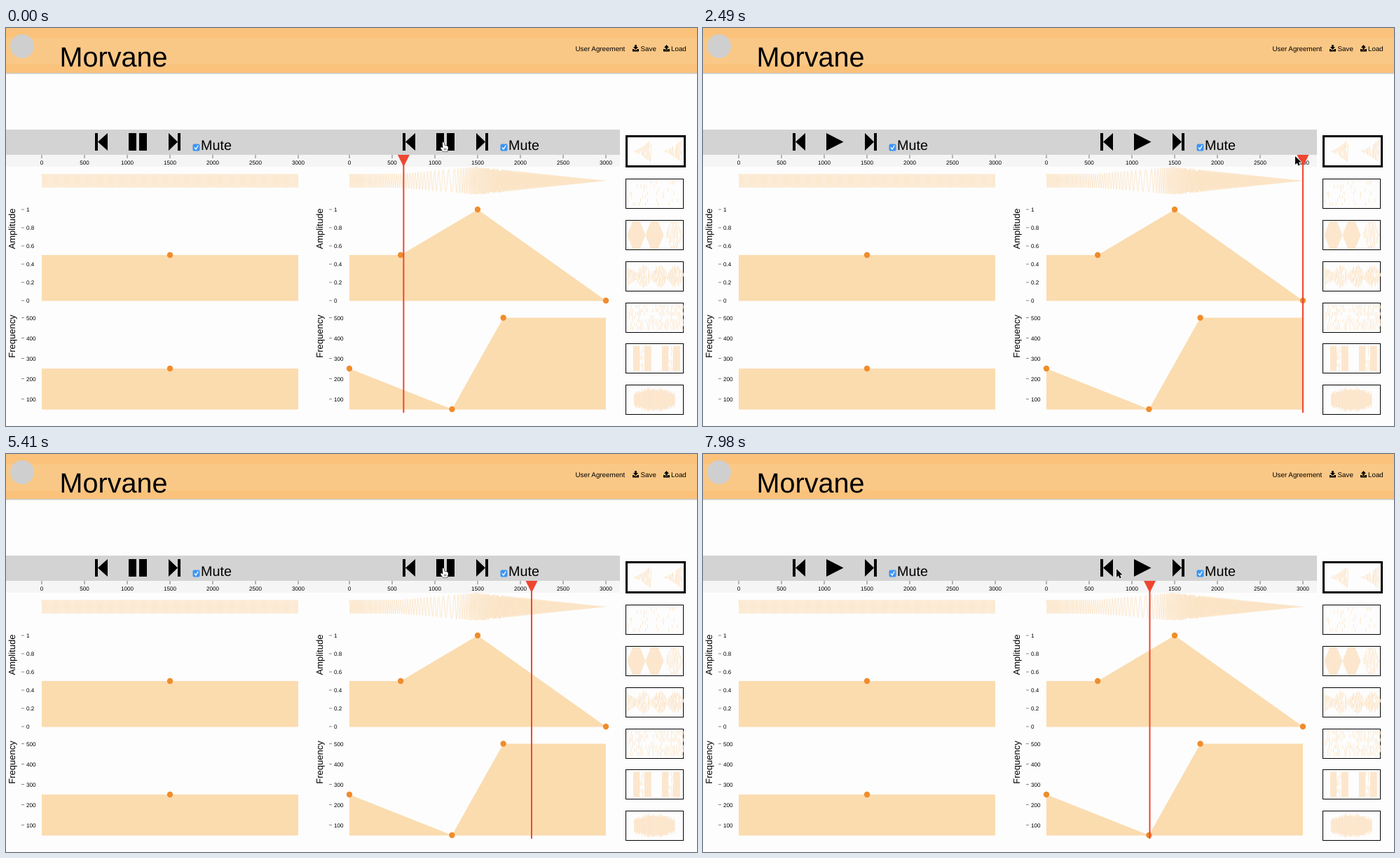
An HTML page with a canvas for the animation above (8 s loop, 986 by 568 pixels).

```html
<!DOCTYPE html>
<html lang="en">
<head>
<meta charset="utf-8">
<title>Vibration editor</title>
<style>
html, body { margin: 0; width: 100%; height: 100%; overflow: hidden; background: #fdfdfd; }
canvas { display: block; }
</style>
</head>
<body>
<canvas id="stage" width="986" height="568"></canvas>
<script>
const W = 986, H = 568, LOOP = 8000;
const PANE = 439, LEFT = 51, PX_PER_MS = 0.122, LENGTH = 3000;
const FONT = 'px "Liberation Sans", Arial, sans-serif';
const AREA = '#fbdcaf', WAVE = '#fce2c2', DOT = '#f08c2c', RED = '#ee4630';

const view = document.getElementById('stage').getContext('2d');
const backdrop = document.createElement('canvas');
backdrop.width = W;
backdrop.height = H;
let g = backdrop.getContext('2d');
g.textRendering = view.textRendering = 'geometricPrecision';

const timeX = ms => LEFT + ms * PX_PER_MS;
const ampY = a => 389 - a * 130;
const freqY = f => 413.5 + (500 - f) * 0.29;
const mix = (a, b, p) => a + (b - a) * p;
const smooth = p => p * p * (3 - 2 * p);

function rect(x, y, w, h, color) {
  g.fillStyle = color;
  g.fillRect(x, y, w, h);
}

function poly(points, color) {
  g.beginPath();
  points.forEach(([x, y]) => g.lineTo(x, y));
  g.closePath();
  g.fillStyle = color;
  g.fill();
}

function disc(x, y, r, color) {
  g.beginPath();
  g.arc(x, y, r, 0, 7);
  g.fillStyle = color;
  g.fill();
}

function text(str, x, y, size, align = 'left') {
  g.font = size + FONT;
  g.textAlign = align;
  g.fillStyle = '#000';
  g.fillText(str, x, y);
}

function sideText(str, x, y) {
  g.save();
  g.translate(x, y);
  g.rotate(-Math.PI / 2);
  text(str, 0, 0, 13, 'center');
  g.restore();
}

/* ---- static parts ---- */

function transferIcon(x, up) {
  const y = 24;
  poly(up ? [[x + 4.5, y], [x + 8, y + 4], [x + 1, y + 4]]
          : [[x + 1, y + 3], [x + 8, y + 3], [x + 4.5, y + 7]], '#000');
  rect(x + 3.2, up ? y + 3 : y, 2.6, 4, '#000');
  poly([[x, y + 6], [x + 2, y + 6], [x + 3, y + 7.5], [x + 6, y + 7.5], [x + 7, y + 6],
        [x + 9, y + 6], [x + 9, y + 9.5], [x, y + 9.5]], '#000');
}

function header() {
  rect(0, 0, W, 65, '#fac27b');
  rect(0, 14, W, 38, '#fac886');
  rect(0, 64, W, 1.5, '#cfcac4');
  disc(23, 26, 17, '#cfcfcf');
  text('Morvane', 76.5, 55, 39.6);
  text('User Agreement', 812.5, 33, 9.8);
  transferIcon(894, false);
  text('Save', 905.5, 33, 9.8);
  transferIcon(938, true);
  text('Load', 949, 33, 9.8);
}

// Value at a time on a curve of [time, value] points, flat beyond its ends
function valueAt(curve, ms) {
  const i = curve.findIndex(point => point[0] > ms);
  if (i < 0) return curve[curve.length - 1][1];
  if (i === 0) return curve[0][1];
  const [t0, a] = curve[i - 1], [t1, b] = curve[i];
  return mix(a, b, (ms - t0) / (t1 - t0));
}

function graph(curve, toY, base) {
  const ends = [0, LENGTH].map(ms => [ms, valueAt(curve, ms)]);
  const points = [ends[0], ...curve, ends[1]].map(([ms, v]) => [timeX(ms), toY(v)]);
  poly([[timeX(0), base], ...points, [timeX(LENGTH), base]], AREA);
  for (const [ms, v] of curve) disc(timeX(ms), toY(v), 4.2, DOT);
}

function wave(amp, freq) {
  const step = 0.2;
  let cycles = 0;
  g.beginPath();
  for (let x = 0; x <= LENGTH * PX_PER_MS; x += step) {
    const ms = x / PX_PER_MS;
    cycles += valueAt(freq, ms) / 470 * step;
    g.lineTo(LEFT + x, 218 - 20 * valueAt(amp, ms) * Math.sin(cycles * 2 * Math.PI));
  }
  g.strokeStyle = WAVE;
  g.lineWidth = 0.8;
  g.stroke();
}

function pane(offset, amp, freq) {
  g.save();
  g.translate(offset, 0);
  for (let ms = 0; ms <= LENGTH; ms += 500) {
    rect(timeX(ms) - 0.5, 181, 1, 5, '#777');
    text(ms, timeX(ms), 195, 8.1, 'center');
  }
  const tick = (label, y) => {
    rect(22, y - 0.5, 4, 1, '#888');
    text(label, 29, y + 3, 8.1);
  };
  for (let i = 0; i <= 5; i++) tick(i / 5, ampY(i / 5));
  for (let f = 100; f <= 500; f += 100) tick(f, freqY(f));
  sideText('Amplitude', 12.5, 286.5);
  sideText('Frequency', 12.5, 440);
  wave(amp, freq);
  graph(amp, ampY, 389.5);
  graph(freq, freqY, 544.5);
  g.restore();
}

let seed = 7;
const random = () => (seed = seed * 16807 % 2147483647) / 2147483647;

// Vertical strokes under an envelope; gaps turns them into broken dashes
function strokes(x0, x1, cy, step, envelope, gaps = 0) {
  for (let x = x0; x < x1; x += step) {
    const h = envelope((x - x0) / (x1 - x0));
    if (!gaps) rect(x, cy - h, 0.8, 2 * h, WAVE);
    else for (let y = -h; y < h; y += 5) {
      if (random() > gaps) rect(x + random(), cy + y, 0.8, Math.min(5, h - y), WAVE);
    }
  }
}

function thumbnails() {
  const top = i => Math.round(156.4 + i * 58.8);
  const middle = i => top(i) + 21.5;
  g.strokeStyle = '#000';
  g.lineWidth = 3;
  g.strokeRect(885.5, 154.5, 83, 43);
  g.lineWidth = 1;
  for (let i = 1; i < 7; i++) g.strokeRect(884.5, top(i) + 0.5, 82, 42);

  const full = () => 18;
  const ramp = u => 1 + 16 * u ** 1.4;
  const diamond = u => Math.min(20, 32 * (1 - Math.abs(2 * u - 1)));
  const beat = u => 4 + 13 * Math.abs(Math.cos(u * 11)) * (0.5 + random() / 2);
  const burr = u => 7 + 6 * Math.sin(Math.PI * u) + 5 * random() ** 2;
  for (const x of [895, 939]) strokes(x, x + 25, middle(0) - 1.5, 1.5, ramp, 0.15);
  strokes(887, 965, middle(1), 2.5, full, 0.85);
  for (const x of [886, 912]) strokes(x, x + 26, middle(2), 0.8, diamond);
  strokes(940, 965, middle(2), 2, diamond, 0.15);
  strokes(886, 966, middle(3), 1.2, beat, 0.15);
  strokes(886, 966, middle(4), 2.4, full, 0.4);
  for (const x of [895, 936]) {
    strokes(x, x + 8, middle(5), 0.8, full);
    strokes(x + 8, x + 16, middle(5), 2.5, full, 0.4);
    strokes(x + 16, x + 25, middle(5), 0.8, full);
  }
  strokes(896, 954, middle(6), 0.8, burr);
}

rect(0, 0, W, H, '#fdfdfd');
header();
rect(0, 145, 876, 36, '#d3d3d3');
rect(0, 181, 876, 17, '#f5f5f5');
pane(0, [[1500, 0.5]], [[1500, 250]]);
pane(PANE, [[600, 0.5], [1500, 1], [3000, 0]], [[0, 250], [1200, 50], [1800, 500]]);
thumbnails();

/* ---- moving parts ---- */

const GRAB = 2680, DROP = 3900, RESUME = 4345, REWIND = 6347, STOP = 7556;
const DROPPED_AT = 1065;

// Playback runs in real time, except for a short lag made up in the first second
function position(t) {
  if (t < GRAB) return Math.min(LENGTH, t + 707 - Math.max(0, 74 - t * 0.07));
  if (t < RESUME) return mix(LENGTH, DROPPED_AT, Math.min(1, (t - GRAB) / (DROP - GRAB)));
  if (t < REWIND) return Math.min(LENGTH, t - RESUME + DROPPED_AT);
  return Math.min(t, STOP) - REWIND;
}

const isPlaying = t => position(t) < LENGTH && t < GRAB || t >= RESUME && t < STOP;

const PAUSE = [624, 163.5], BACK = [590, 164], HANDLE = [845, 183], RELEASE = [610, 183];
// Where the pointer rests: [arrival, departure, spot]
const RESTS = [[0, 1100, PAUSE], [2250, GRAB, HANDLE], [DROP, DROP + 100, RELEASE],
  [4220, 5800, PAUSE], [6200, 6850, BACK], [7200, 7660, PAUSE], [7970, LOOP, BACK]];

function pointerAt(t) {
  const i = RESTS.findLastIndex(rest => rest[0] <= t);
  const [, leave, from] = RESTS[i];
  if (t <= leave) return from;
  if (from === HANDLE && t < DROP) return [timeX(position(t)) + PANE - 10, from[1]];
  const [arrive, , to] = RESTS[i + 1];
  const p = smooth((t - leave) / (arrive - leave));
  return from.map((v, axis) => mix(v, to[axis], p));
}

function transport(offset, playing) {
  const d = playing ? 0 : 1;
  g.save();
  g.translate(offset, 0);
  rect(127 + d, 150, 4, 25, '#000');
  poly([[131 + d, 162.5], [145 + d, 150], [145 + d, 175]], '#000');
  if (playing) {
    rect(175, 150, 11, 25, '#000');
    rect(190, 150, 11, 25, '#000');
  } else {
    poly([[176, 150], [200.5, 162.5], [176, 175]], '#000');
  }
  poly([[232 - d, 150], [245 - d, 162.5], [232 - d, 175]], '#000');
  rect(245 - d, 150, 4, 25, '#000');
  g.beginPath();
  g.roundRect(266.5 - d, 165.5, 10, 10, 2);
  g.fillStyle = '#3b95f5';
  g.fill();
  g.beginPath();
  g.moveTo(269 - d, 170.5);
  g.lineTo(271 - d, 173);
  g.lineTo(274.3 - d, 167.5);
  g.strokeStyle = '#fff';
  g.lineWidth = 1.4;
  g.stroke();
  text('Mute', 278 - d, 174, 19.8);
  g.restore();
}

function playhead(x) {
  rect(x - 1, 190, 2, 359, RED);
  poly([[x - 8.5, 181], [x + 8.5, 181], [x, 198]], RED);
}

const ARROW = new Path2D('M0 0V12L2.8 9.4 4.6 13.4 6.7 12.5 5 8.6H8.6Z');
const HAND = new Path2D('M-1.2 0Q0-1 1 0L1.6 4 4 4.4 6.4 5.2 7 8 5.8 11.5V13H-.4L-3.6 8.6Q-4.4 6.6-2.6 6.8L-.6 8Z');

function pointer(x, y) {
  const overButton = x > 612 && x < 642 && y < 176;
  const shape = overButton ? HAND : ARROW;
  g.save();
  g.translate(x, y);
  g.lineJoin = 'round';
  g.lineWidth = overButton ? 1 : 1.6;
  g.strokeStyle = overButton ? '#000' : '#fff';
  g.fillStyle = overButton ? '#fff' : '#000';
  g.stroke(shape);
  g.fill(shape);
  if (overButton) {
    rect(1.4, 8, 0.7, 3, '#000');
    rect(3.4, 8, 0.7, 3, '#000');
  }
  g.restore();
}

function draw(t) {
  const playing = isPlaying(t);
  g = view;
  g.drawImage(backdrop, 0, 0);
  transport(0, playing);
  transport(PANE, playing);
  playhead(timeX(position(t)) + PANE);
  pointer(...pointerAt(t));
}

const begin = performance.now();
function tick() {
  draw((performance.now() - begin) % LOOP);
  requestAnimationFrame(tick);
}
tick();
</script>
</body>
</html>
```
